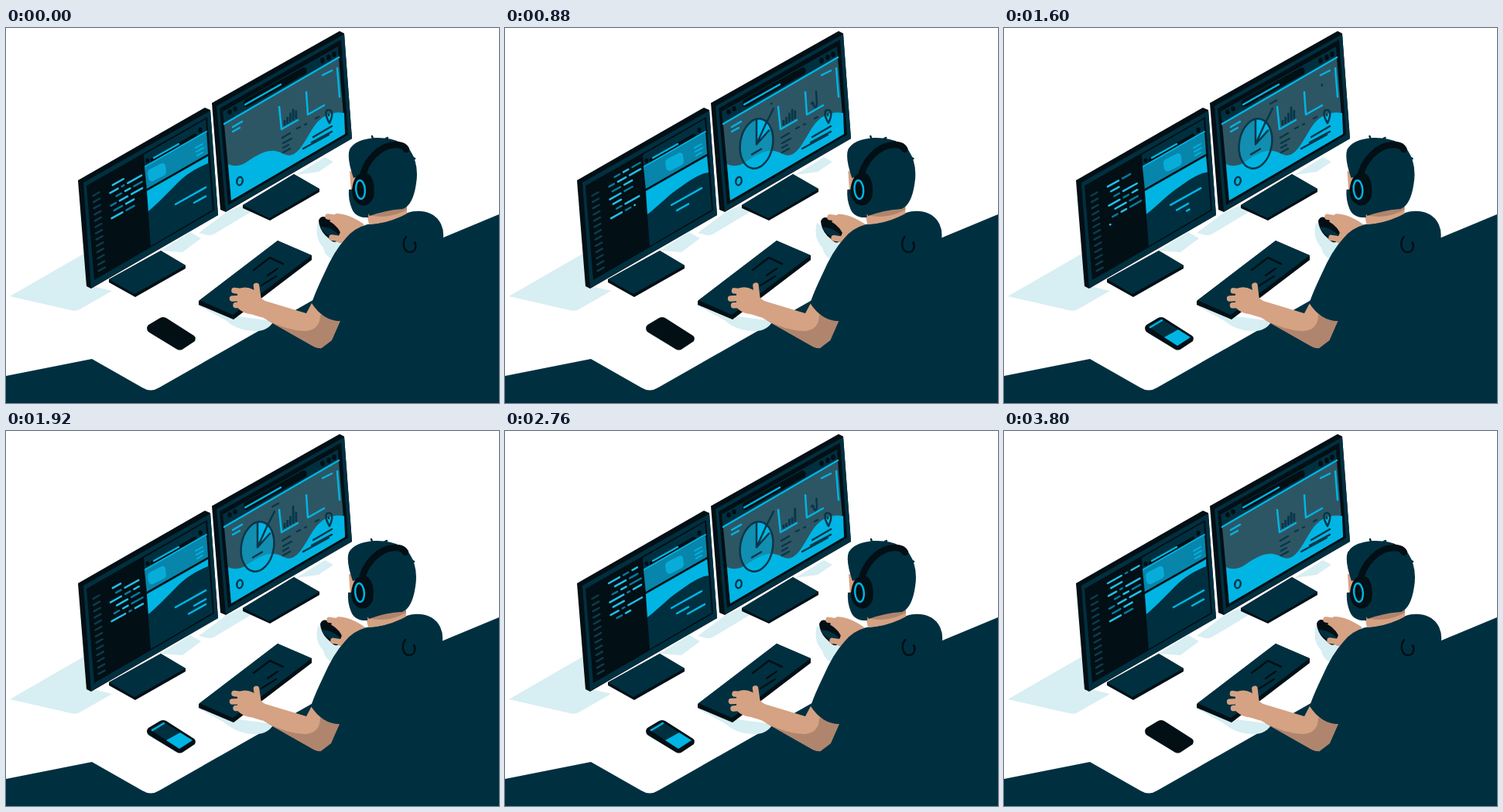
Write an HTML page that moves like this. It is 637 px wide and 485 px high and loops after 3840 ms.

```html
<!DOCTYPE html>
<html lang="en">
<head>
<meta charset="utf-8">
<title>Developer at a desk</title>
<style>
html, body { margin: 0; height: 100%; overflow: hidden; background: #fff; }
svg { display: block; width: 637px; height: 485px; }
path, ellipse { stroke-linecap: round; stroke-linejoin: round; }
.n { fill: #003040; } .k { fill: #020f15; } .c { fill: #00b5e3; }
.g { fill: #2d5665; } .m { fill: #0785aa; } .w { fill: #d7eef3; }
.skin { fill: #d5a283; } .shade { fill: #b0856d; }
.l { fill: none; stroke-width: 2.5; }
.ln { stroke: #07374a; } .lk { stroke: #020f15; } .lc { stroke: #00b5e3; }
.finger { fill: none; stroke: #d5a283; stroke-width: 7.5; }
</style>
</head>
<body>
<svg viewBox="0 0 637 485">
  <!-- floor and cast shadows -->
  <path class="n" d="M0 450L111 428L176 465Q187 472 198 465L400 350L565 271L637 241V485H0Z"/>
  <path class="w" d="M5 347L102 291L112 334L137 340L95 364Q90 367 84 365ZM200 288L238 264L252 272L228 290ZM249 265L285 238L306 229L318 237L268 267Q262 269 257 267ZM375 190L412 167L423 173L404 186Z"/>
  <path class="w" d="M245 357L293 372L346 379Q338 393 320 392Q298 391 284 378ZM181 390L222 417L226 418L190 398ZM403 252Q398 272 410 284Q414 300 427 299L437 276Z"/>

  <!-- left monitor -->
  <path class="k" d="M133 325L200 288L232 307V311L167 348L133 329Z"/>
  <path class="n" d="M133 325L200 288L232 307L166 344Z"/>
  <path class="k" d="M93 197L257 103L264 106L274 242L110 337L104 334Z"/>
  <path class="n" d="M100 200L264 107L274 242L110 336Z"/>
  <path class="k" d="M104 204L260 115L269 236L114 326Z"/>
  <path class="n" d="M178 164L258 118L267 235L187 282Z"/>
  <path class="k" d="M187 169L243 137Q248 136 246 142L190 174Q186 174 187 169Z"/>
  <path class="l lc" d="M191 168L223 150"/>
  <path class="l lk" style="stroke-width:5" d="M183 171v1M251 131v2"/>
  <path class="m" d="M179 180L259 135L261 163L182 208Z"/>
  <path class="l lc" d="M180 179L259 134" style="stroke-width:2"/>
  <path class="l lc" style="stroke-width:2" d="M245 155L254 150M246 160L255 155M247 165L254 161"/>
  <path id="banner" style="fill:#08acd9" d="M187 182L201 175Q205 174 206 178L207 186Q207 189 204 191L190 198Q185 199 184 194L183 188Q183 184 187 182Z"/>
  <path id="slope" class="c"/>
  <path class="l lk" style="stroke-width:2" d="M182 209L261 164"/>
  <path id="caption" class="l lc"/>
  <path id="gutter" class="l" style="stroke:#0b3c4c"/>
  <path id="dim" class="l" style="stroke:#07799b"/>
  <path id="bright" class="l" style="stroke:#22bfe6"/>

  <!-- right monitor -->
  <path class="k" d="M306 229L372 189L405 208V212L341 249L306 233Z"/>
  <path class="n" d="M306 229L372 189L405 208L340 246Z"/>
  <path class="k" d="M266 97L431 4L437 7L447 143L284 238L277 235Z"/>
  <path class="n" d="M272 101L437 8L447 143L284 237Z"/>
  <path class="k" d="M276 104L433 15L442 138L287 229Z"/>
  <path class="n" d="M280 108L429 24L430 39L282 125Z"/>
  <path class="k" d="M308 93L384 51Q390 50 388 59L312 102Q304 103 308 93Z"/>
  <path class="l lc" d="M309 99L355 73"/>
  <path class="l lk" style="stroke-width:5.5" d="M289 108v1M296 104v1M409 41v2M417 37v2M424 33v2"/>
  <path class="g" d="M282 125L430 39L438 137L291 223Z"/>
  <path class="c" d="M287 176Q299 182 313 172Q334 157 348 159C359 161 362 168 372 163C385 155 391 134 403 121Q417 106 437 110L438 137L291 223Z"/>
  <path class="l lc" d="M282 124L430 38M353 102L356 131L377 119M388 83L390 112L411 100M428 52L431 89M409 61L421 55M293 128L305 121M293 134L302 129"/>
  <path class="l ln" d="M357 142L367 136M358 149L369 143M358 155L365 151M358 161L367 156M376 130L380 128M386 125L388 124M400 117L404 115M397 141L421 127M395 148L421 134M384 156L417 138"/>
  <path class="l ln" d="M418 123C411 111 413 106 417 106C422 106 423 112 418 123ZM417 112v1"/>
  <ellipse class="l ln" cx="302" cy="198" rx="3.7" ry="5.3" transform="rotate(12 302 198)"/>
  <path id="bars" class="l ln" style="stroke-width:2.8;stroke-linecap:butt"/>
  <path id="curve" class="l ln" pathLength="1" d="M396 98C397 95 399 96 399 101Q402 105 403 98L402 82C402 72 405 72 406 77S409 82 411 73"/>
  <g id="pie">
    <ellipse class="c" fill-opacity=".6" rx="21" ry="32" transform="rotate(10)"/>
    <path class="c" d="M0 0L0 -31Q12 -32 18 -19Z"/>
    <ellipse class="l ln" rx="21" ry="32.5" transform="rotate(10)"/>
    <path class="l ln" d="M0 -30V1L13 -28M0 1L16 -17M-6 14L6 7"/>
  </g>
  <path id="needle" class="l ln"/>
  <path id="tick" class="l ln"/>

  <!-- keyboard, phone -->
  <path class="k" d="M249 353L351 275L395 294V300L294 377L249 358Z"/>
  <path class="n" d="M250 352L351 275L395 294L293 371Z"/>
  <path class="l lk" d="M320 313L341 297L358 305M338 320L351 311M330 333L349 321"/>
  <path class="k" d="M184 384L199 375Q203 373 207 375L243 398Q246 400 244 405L229 415Q225 418 220 415L184 393Q180 388 184 384Z"/>
  <g id="phone">
    <path class="n" d="M186 386L203 376L241 400L224 411Z"/>
    <path class="c" d="M207 400L225 390L241 400L224 411Z"/>
    <path class="l lc" d="M189 387L204 378"/>
  </g>

  <!-- hand with mouse -->
  <g id="mouse">
    <path class="k" d="M404 249Q407 241 416 246L430 256Q434 266 430 273Q425 281 417 272Q405 263 404 249Z"/>
    <path class="n" d="M406 257Q418 256 431 268Q427 277 419 270Q409 264 406 257Z"/>
    <path class="skin" d="M426 240Q441 239 463 254L441 275Q433 281 427 276L432 264Q427 255 418 250Z"/>
    <path class="finger" d="M416 244L430 246M421 271L434 273"/>
  </g>

  <!-- left arm -->
  <path class="skin" d="M325 350L388 369L396 354L433 377L421 404C416 415 407 417 396 411L324 370Z"/>
  <path class="shade" d="M336 377Q362 391 386 392Q406 391 406 371L433 376L421 404C416 415 407 417 396 411Z"/>
  <g id="hand">
    <path class="skin" d="M299 338Q308 332 320 338L331 350L338 355L331 374L318 370Q306 369 299 361Z"/>
    <path id="fingers" class="finger"/>
  </g>

  <!-- person -->
  <g id="person">
    <path class="n" d="M467 254Q492 253 519 239C533 234 552 237 560 250Q566 259 565 271L580 300V420H400L421 404L432 379Q410 379 395 356Q399 343 411 318Q424 288 439 272Q449 259 467 254Z"/>
    <path class="l lk" d="M517 270C511 278 514 290 522 290C529 290 531 282 528 277"/>
    <path class="skin" d="M444 185L470 190L518 225V240Q494 253 469 254L466 240L447 228Z"/>
    <path class="shade" d="M468 238L518 231V235Q494 248 470 242Z"/>
    <path class="n" d="M449 194Q440 168 444 157Q451 144 477 142Q508 141 522 158Q534 176 530 201Q526 229 513 234Q492 235 470 243L462 230V190Z"/>
    <path class="n" d="M443 209Q455 207 470 225L468 245Q452 246 447 234Q442 222 443 209Z"/>
    <path class="l" style="stroke:#003040" d="M473 140Q474 145 479 147M489 148Q489 143 493 142M520 167Q525 166 528 169"/>
    <path class="l lk" style="stroke-width:8.5" d="M460 196C463 172 484 150 505 151Q514 151 517 157"/>
    <path class="k" d="M452 193Q459 184 469 189Q478 199 475 219Q469 232 458 229Q447 224 447 209Q448 199 452 193Z"/>
    <ellipse class="l lc" cx="458" cy="209" rx="5.8" ry="12" transform="rotate(-5 458 209)"/>
  </g>
</svg>
<script>
const LOOP = 3840, ROW_MS = 320, ROW_H = 8.2;
const ROWS = [" ====", "=== - =====", "  -- == ---", "-- === ====", " --- ===", "==== ---", " ===",
  "  -- =====", "==== -- ==", "  ==== ---", " -- == ----", "===== - ==="];
const $ = id => document.getElementById(id);
const draw = (id, d) => $(id).setAttribute("d", d);
const ramp = (t, a, b) => {
  const u = Math.min(1, Math.max(0, (t - a) / (b - a)));
  return u * u * (3 - 2 * u);
};
const mix = (a, b, u) => a + (b - a) * u;
const pulse = (t, a, b, c, d) => ramp(t, a, b) - ramp(t, c, d);
const dash = (x, y, w) => `M${x} ${y}l${w} ${-w * 0.56}`;

draw("gutter", Array.from({ length: 13 }, (_, i) => dash(112.5 + i * 0.6, 217 + i * 8.1, 8)).join(""));

function drawCode(t) {
  const step = Math.floor(t / ROW_MS), typed = t % ROW_MS / ROW_MS;
  const scroll = ramp(typed, 0, 0.25);
  const out = { "-": "", "=": "" };
  for (let n = 0; n < 7; n++) {
    const row = ROWS[(step + n) % ROWS.length];
    const limit = n === 6 ? typed * 11 : 11;
    const y = 197 + (n + 1 - scroll) * ROW_H;
    for (const run of row.matchAll(/-+|=+/g)) {
      const from = run.index, to = Math.min(from + run[0].length, limit);
      if (to <= from) continue;
      const x = from * 3.8;
      out[run[0][0]] += dash(134 + x + n * 0.5, y - x * 0.56, Math.max(0.5, (to - from) * 3.8 - 1.2));
    }
  }
  draw("dim", out["-"]);
  draw("bright", out["="]);
}

function drawBanner(t) {
  const s = pulse(t, 440, 720, 1560, 1860) + pulse(t, 2400, 2720, 3000, 3300);
  const p = (a, b) => mix(a, b, s);
  $("banner").setAttribute("transform", `translate(${24 * s} ${-13.5 * s})`);
  draw("slope", `M182 211L261 166L${p(261, 263)} ${p(175, 187)}` +
    `C${p(247, 250)} ${p(181, 188)} 235 ${p(187, 200)} 222 ${p(200, 209)}` +
    `S${p(201, 202)} ${p(222, 227)} 184 ${p(237, 241)}Z`);
  const extra = 22 * pulse(t, 1500, 1900, 2800, 3200);
  draw("caption", dash(p(219, 215), p(228, 229), 39) + dash(p(243, 222), p(226, 236), 15) +
    (extra ? dash(236, 236.5, extra) : ""));
}

function drawCharts(t) {
  const pie = pulse(t, 200, 760, 3240, 3560);
  $("pie").setAttribute("transform", `translate(325 149.5) scale(${pie})`);
  const reach = pulse(t, 560, 820, 3080, 3340);
  draw("needle", reach ? `M338 122l${9 * reach} ${-18 * reach}` : "");
  const tick = pulse(t, 840, 1080, 2400, 2640);
  draw("tick", tick ? dash(344, 98, 8 * tick) : "");

  const phase = t % 1920;
  const head = ramp(phase, 540, 1180), tail = ramp(phase, 880, 1680);
  const curve = $("curve");
  curve.style.display = head - tail > 0.005 ? "" : "none";
  curve.style.strokeDasharray = `${head - tail} 2`;
  curve.style.strokeDashoffset = -tail;

  const swing = pulse(t, 1400, 1900, 2000, 2500), lean = pulse(t, 2400, 2700, 2850, 3200);
  const heights = [7 - 2 * lean, 9 - 4 * lean, 12 - 4 * lean, 15 + 8 * swing - 7 * lean, 11 + 2 * swing + 7 * lean];
  draw("bars", heights.map((h, i) => `M${360 + i * 3.7} ${126 - i * 2.1}v${-h}`).join(""));
}

function drawPerson(t) {
  const sway = t < 2560 ? Math.sin(Math.PI * t / 1280) ** 2 : 0;
  $("person").setAttribute("transform", `translate(${-sway} 0)`);
  const push = 2 * pulse(t, 200, 700, 2900, 3300) + 2 * pulse(t, 500, 800, 900, 1200);
  $("mouse").setAttribute("transform", `translate(${push} ${push * 0.2})`);
  const tap = k => Math.sin(Math.PI * (t / 240 + k / 4)) ** 2 * 2;
  draw("fingers", `M310 341L${295 + tap(0)} ${339 + tap(0) / 2}M306 349L${291.5 + tap(1)} ${350 - tap(1) / 2}` +
    `M309 358L${295 + tap(2)} ${359 - tap(2) / 2}M326 350L${323 + tap(3) / 2} 333`);
  $("hand").setAttribute("transform", `translate(0 ${tap(2) / 4})`);
}

function frame(now) {
  const t = now % LOOP;
  drawCode(t);
  drawBanner(t);
  drawCharts(t);
  drawPerson(t);
  $("phone").style.opacity = pulse(t, 1480, 1600, 3560, 3680);
  requestAnimationFrame(frame);
}
requestAnimationFrame(frame);
</script>
</body>
</html>
```
